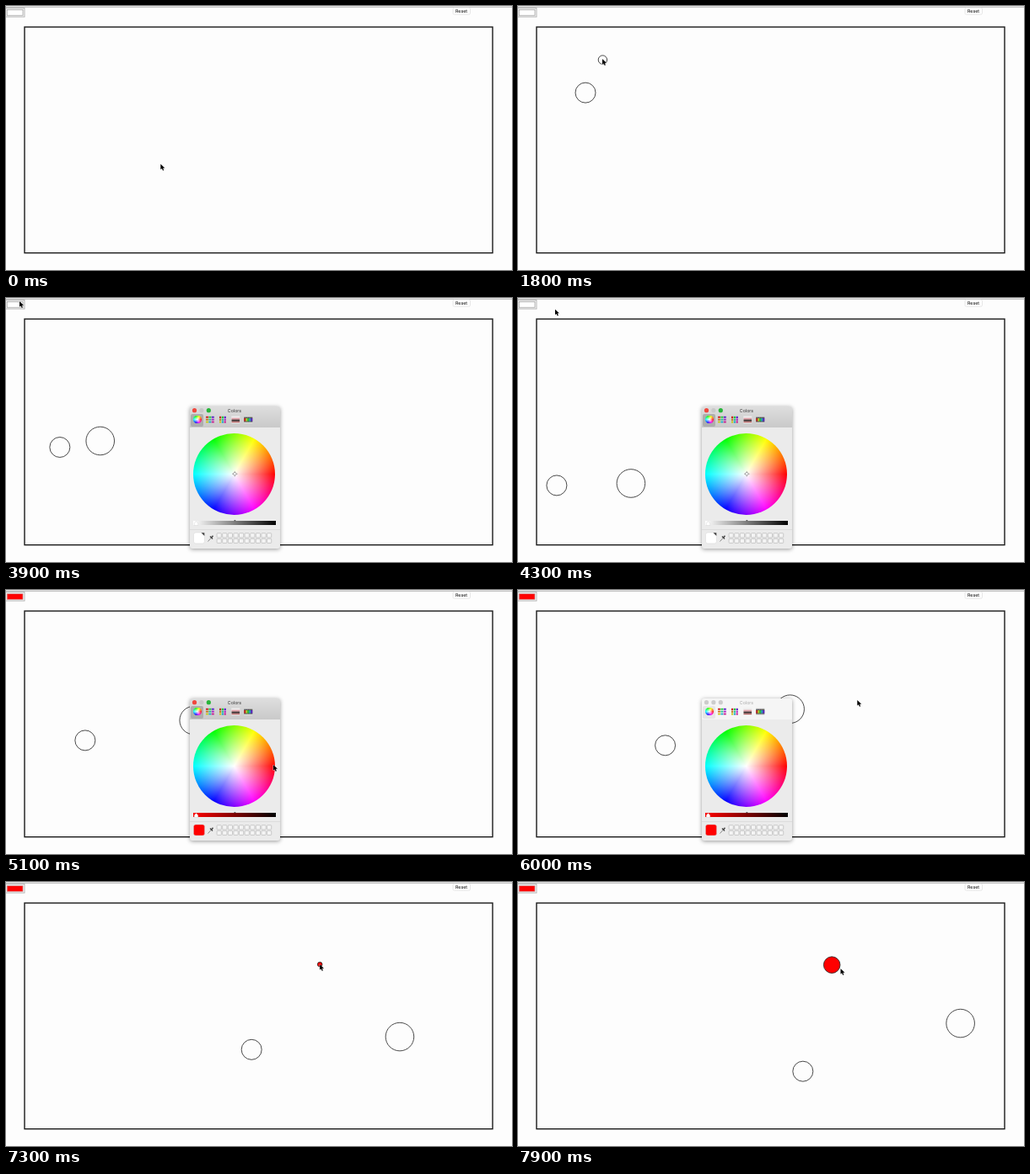
These frames come from a looping animation (600x314 px, 8 s). An HTML page:

```html
<!DOCTYPE html>
<html lang="en">
<head>
<meta charset="utf-8">
<title>Bouncing balls</title>
<style>
  html, body { margin: 0; width: 100%; height: 100%; overflow: hidden; background: #fdfdfd; }
  svg { position: absolute; left: 0; top: 0; }
  text { font-family: Inter, Arial, sans-serif; font-size: 5.3px; text-anchor: middle; }
  .ball { stroke: #2a2a2a; stroke-width: .85; }
  #picker {
    position: absolute; left: 217.5px; top: 129px; width: 107px; height: 169px;
    border-radius: 3px; background: #ebebeb; box-shadow: 0 1px 5px rgba(0, 0, 0, .4);
  }
  #bar { height: 25px; border-radius: 3px 3px 0 0; background: linear-gradient(#dedede, #c9c9c9); }
  .inactive #bar { background: #f5f5f5; }
  .wheel {
    position: absolute; border-radius: 50%;
    background: radial-gradient(closest-side, #fff, rgba(255, 255, 255, 0)),
      conic-gradient(from 90deg, #f00, #f0f, #00f, #0ff, #0f0, #ff0, #f00);
  }
  #big { left: 4.5px; top: 32px; width: 97px; height: 97px; }
  #mini { left: 4.8px; top: 11px; width: 9.4px; height: 9.4px; }
  #tab { position: absolute; left: 1.5px; top: 9px; width: 15px; height: 15px; border-radius: 2px; background: #adadad; }
  .inactive #tab { background: #e6e6e6; }
  #slider { position: absolute; left: 4.5px; top: 135.6px; width: 97.5px; height: 5.4px; }
</style>
</head>
<body>
<svg width="600" height="314">
  <path d="M0 1.2H600" stroke="#c4c4c4" stroke-width="1.4"/>
  <rect x="-.5" y="2.5" width="22.5" height="10.5" fill="#f4f4f4" stroke="#aaa" stroke-width=".8"/>
  <rect id="chosen" x="1.2" y="4.4" width="18.8" height="6.8" stroke-width=".7"/>
  <rect x="530" y="2" width="20.5" height="8" rx="1.5" fill="#fff" stroke="#ddd" stroke-width=".7"/>
  <text x="540" y="8">Reset</text>
  <rect x="22" y="25" width="555" height="268.7" fill="none" stroke="#1a1a1a" stroke-width="1.4"/>
  <g id="balls"></g>
</svg>

<div id="picker">
  <div id="bar"></div>
  <div id="tab"></div>
  <div id="big" class="wheel"></div>
  <div id="mini" class="wheel"></div>
  <div id="slider"></div>
  <svg width="107" height="169" viewBox="217.5 129 107 169">
    <g id="lights"></g>
    <text id="title" x="270.5" y="135.7">Colors</text>
    <g id="sliders"></g>
    <g id="dots"></g>
    <g id="pencils"></g>
    <rect x="266.8" y="140.5" width="10" height="8.5" fill="#eee"/>
    <path d="M267 143.6h9.6" stroke="#e0a0a8" stroke-width="2"/>
    <path d="M267 145.6h9.6" stroke="#3a2626" stroke-width="2"/>
    <path d="M267 147.6h9.6" stroke="#b04a4a"/>
    <g id="cross" fill="none" stroke="#777" stroke-width=".55">
      <circle cx="270.8" cy="209.2" r="1.8" fill="#fff"/>
      <path d="M267.5 209.2h2m2.6 0h2M270.8 205.9v2m0 2.6v2"/>
    </g>
    <path d="M269.7 264h2.4l-1.2 1.8z" fill="#555"/>
    <path d="M225 265.5l2.2 2.4v2.6h-4.4v-2.6z" fill="#fff" stroke="#ccc" stroke-width=".4"/>
    <path d="M217.5 275.5h107" stroke="#d6d6d6" stroke-width=".7"/>
    <rect id="swatch" x="222" y="279" width="13" height="13" rx="2.5" stroke="#ccc" stroke-width=".4"/>
    <path id="fold" d="M231 279.2h3.8v3.8z" fill="#444"/>
    <path d="M239 289.5l4-4.5" stroke="#888"/>
    <path d="M241.5 283.5l3 3M243 285l2-2.3" stroke="#444" stroke-width="1.4"/>
    <g id="wells" fill="#f4f4f4" stroke="#bbb" stroke-width=".7"></g>
  </svg>
</div>

<svg width="600" height="314">
  <path id="cursor" d="M0 0V6.6L1.6 5.2 2.7 7.8 3.9 7.3 2.8 4.8H5Z" stroke="#fff" stroke-width=".6" paint-order="stroke"/>
</svg>

<script>
const LOOP = 8000, STEP = 100;
const GRAVITY = 245, LEFT = 22, FLOOR = 294;

// The page freezes while the color picker opens, and again while a ball is added.
const pauses = [{ at: 3.62, lasts: .48 }, { at: 7.75, lasts: .08 }];

// A ball grows from born to release, falls, and may be kicked aside by another ball.
const balls = [
  { born: .55, release: 1.3, x: 80, y: 72.5, r: 12, bounce: .815, fill: "#fdfdfd",
    kick: { at: 3.44, vx: -89.7, y: 145, vy: 158.5 } },
  { born: 1.4, release: 2.69, x: 100.4, y: 64, r: 16.8, bounce: .85, fill: "#fdfdfd",
    kick: { at: 3.518, vx: 111, y: 148, vy: 203 } },
  { born: 7.1, release: 7.8, x: 372.2, y: 98, r: 9.8, bounce: .83, fill: "#f00" }
];

const cursorStart = [183.3, 188];
const cursorMoves = [
  { from: .59, to: .6, x: 80, y: 72 },
  { from: 1.3, to: 1.4, x: 100, y: 63 },
  { from: 2.7, to: 2.8, x: 60, y: -20 },
  { from: 3.3, to: 3.5, x: 16, y: 4 },
  { from: 4.1, to: 4.3, x: 44, y: 13.5 },
  { from: 4.3, to: 4.9, x: 317, y: 208 },
  { from: 5.4, to: 6, x: 402.3, y: 131 },
  { from: 6.3, to: 6.8, x: 224, y: 134 },
  { from: 7, to: 7.2, x: 372, y: 98 },
  { from: 7.8, to: 7.9, x: 382.5, y: 103 }
];

const $ = id => document.getElementById(id);
const clamp = (v, min, max) => Math.min(max, Math.max(min, v));
const progress = (t, from, to) => clamp((t - from) / (to - from), 0, 1);
const smooth = p => p * p * (3 - 2 * p);
const show = (el, on) => set(el, { visibility: on ? "visible" : "hidden" });

function set(el, attrs) {
  for (const key in attrs) el.setAttribute(key, attrs[key]);
}
function add(parent, tag, attrs) {
  const el = document.createElementNS("http://www.w3.org/2000/svg", tag);
  set(el, attrs);
  return $(parent).appendChild(el);
}

function pageTime(t) {
  return pauses.reduce((sum, p) => sum - clamp(t - p.at, 0, p.lasts), t);
}

// Height after a time of free fall with damped bounces.
function fall(y, vy, floor, bounce, time) {
  for (;;) {
    const impact = Math.sqrt(vy * vy + 2 * GRAVITY * (floor - y));
    const hit = (impact - vy) / GRAVITY;
    if (time < hit) return y + vy * time + GRAVITY / 2 * time * time;
    time -= hit;
    y = floor;
    vy = -impact * bounce;
  }
}

function ballAt({ x, y, r, release, bounce, kick }, t) {
  const now = pageTime(t), floor = FLOOR - r, wall = LEFT + r;
  if (!kick || now < kick.at) {
    return [x, fall(y, 0, floor, bounce, Math.max(0, now - pageTime(release)))];
  }
  const since = now - kick.at;
  return [wall + Math.abs(x + kick.vx * since - wall), fall(kick.y, kick.vy, floor, bounce, since)];
}

function cursorAt(t) {
  return cursorMoves.reduce(([x, y], move) => {
    const p = smooth(progress(t, move.from, move.to));
    return [x + (move.x - x) * p, y + (move.y - y) * p];
  }, cursorStart);
}

for (const b of balls) b.el = add("balls", "circle", { class: "ball", fill: b.fill });
const lights = [0, 1, 2].map(i => add("lights", "circle", { cx: 223 + i * 8.4, cy: 133.7, r: 2.6 }));
for (let i = 0; i < 9; i++) {
  const col = i % 3, row = Math.floor(i / 3), fill = `hsl(${i * 130}, 75%, 45%)`;
  add("dots", "rect", { x: 252.5 + col * 2.8, y: 140.8 + row * 2.8, width: 2.2, height: 2.2, fill });
  add("sliders", "rect", { x: 236.5 + col * 3.4, y: 140.8 + row * 2.9, width: 3, height: 1.8, fill });
}
add("pencils", "rect", { x: 281.8, y: 140.5, width: 10, height: 8.5, fill: "#ddd" });
for (let i = 0; i < 5; i++) {
  const x = 281.9 + i * 2;
  add("pencils", "rect", { x, y: 141.6, width: 1.8, height: 6, fill: "#444" });
  add("pencils", "rect", { x, y: 143, width: 1.8, height: 3.6, fill: `hsl(${i * 65}, 75%, 45%)` });
}
for (let i = 0; i < 20; i++) add("wells", "rect",
  { x: 249.6 + i % 10 * 6.6, y: i < 10 ? 279.7 : 286.3, width: 5.2, height: 5.2, rx: .7 });

function draw(t) {
  for (const b of balls) {
    const [cx, cy] = ballAt(b, t);
    set(b.el, { cx, cy, r: b.r * progress(t, b.born, b.release) });
    show(b.el, t > b.born);
  }
  set($("cursor"), { transform: `translate(${cursorAt(t)})` });

  const red = t >= 5.1, inactive = t >= 5.8, hover = t >= 6.8;
  const color = red ? "#f00" : "#fff";
  $("picker").style.display = t >= 3.9 && t < 7 ? "block" : "none";
  $("picker").className = inactive ? "inactive" : "";
  $("slider").style.background = `linear-gradient(90deg, ${color}, #000)`;
  set($("chosen"), { fill: color, stroke: red ? "#c99" : "#999" });
  set($("swatch"), { fill: color });
  show($("fold"), !red);
  show($("cross"), !red);
  set($("title"), { fill: inactive ? "#aaa" : "#333" });
  const tints = inactive && !hover ? ["#ccc", "#ccc", "#ccc"] : ["#f0483e", "#c8c8c8", "#27b53a"];
  lights.forEach((el, i) => set(el, { fill: tints[i] }));
}

function tick() {
  const step = Math.floor(performance.now() % LOOP / STEP);
  draw(step * STEP / 1000 + 1e-6);
  requestAnimationFrame(tick);
}
tick();
</script>
</body>
</html>
```
